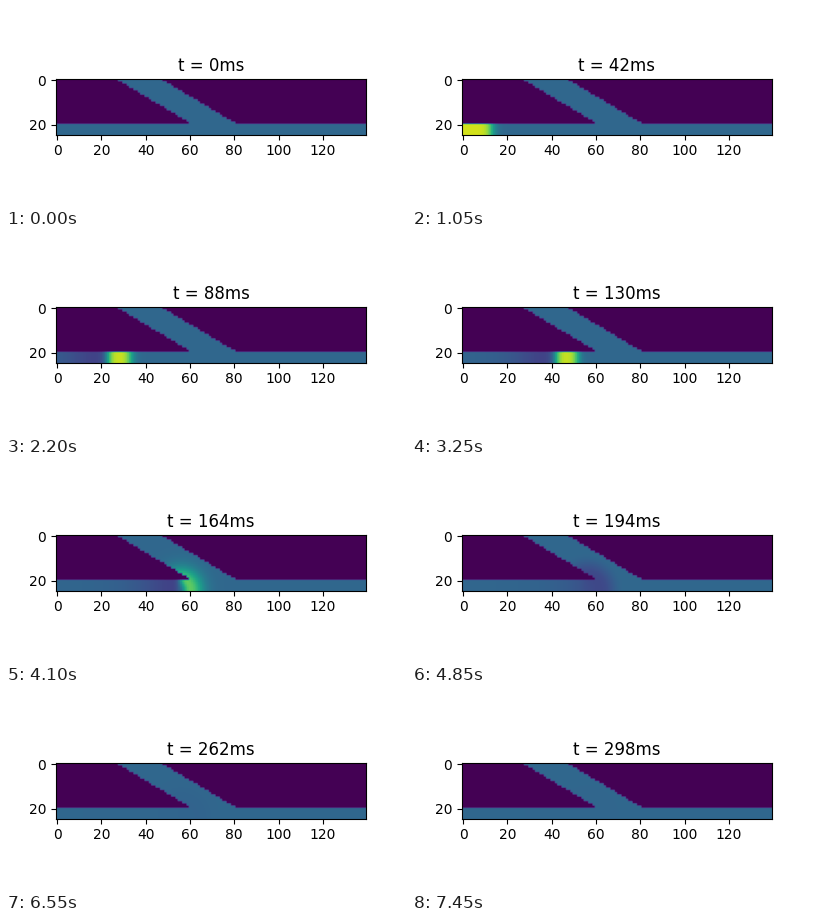
A matplotlib script that plays this animation: 400x200 px, repeating every 7.5 s.

```python
import numpy as np
import matplotlib.pyplot as plt
from matplotlib.animation import FuncAnimation

W, H = 140, 25
STRIP = 20            # first row of the horizontal strand
FRAMES, STEP = 150, 2  # simulated ms per frame
SPEED = 0.44          # cells per ms

row, col = np.mgrid[:H, :W].astype(float)
left = 27.65 + 1.7 * row
branch = (row < STRIP) & (col >= left) & (col <= left + 20.1)
tissue = branch | (row >= STRIP)


def sig(x):
    return 1 / (1 + np.exp(-np.clip(x, -60, 60)))


def softplus(x, k):
    return k * np.logaddexp(0, x / k)


def smooth(x, a, b):
    p = np.clip((x - a) / (b - a), 0, 1)
    return p * p * (3 - 2 * p)


# Path length travelled by the wave: straight along the strand,
# then fanning out in arcs at the junction.
dx, dy = col - 56, H - 1 - row
fan = np.where(row < STRIP, 1, smooth(col, 52, 62))
path = col + fan * (np.hypot(dx, dy) - dx)


def potential(t):
    front = 4 + softplus(13 + SPEED * (t - 42) - 4, 2)
    front = 66 - softplus(66 - front, 3)      # blocked at the junction
    back = 23 + 0.45 * (t - 88) - 9 * np.exp(-(t - 42) / 9)

    spread = 1.25 + 0.9 * smooth(t, 145, 165)
    pulse = sig((front - path) / spread) * sig((path - back) / 1.1)
    pulse *= 0.9 * smooth(t, 0, 12) * sig((176 - t) / 6)

    lag = np.maximum(back - path, 0) / 0.45
    dip = 0.21 * sig((back - path) / 1.1) / (1 + (lag / 42) ** 3)
    dip *= sig((67 - path) / 2)
    return np.where(tissue, pulse - dip, -0.5)


fig, ax = plt.subplots(figsize=(4, 2), dpi=100)
image = ax.imshow(potential(0), cmap="viridis", vmin=-0.5, vmax=1)
title = ax.set_title("t = 0ms")


def update(i):
    t = i * STEP
    image.set_data(potential(t))
    title.set_text(f"t = {t}ms")
    return image, title


anim = FuncAnimation(fig, update, frames=FRAMES, interval=50,
                     repeat=True, repeat_delay=0)
plt.show()
```
